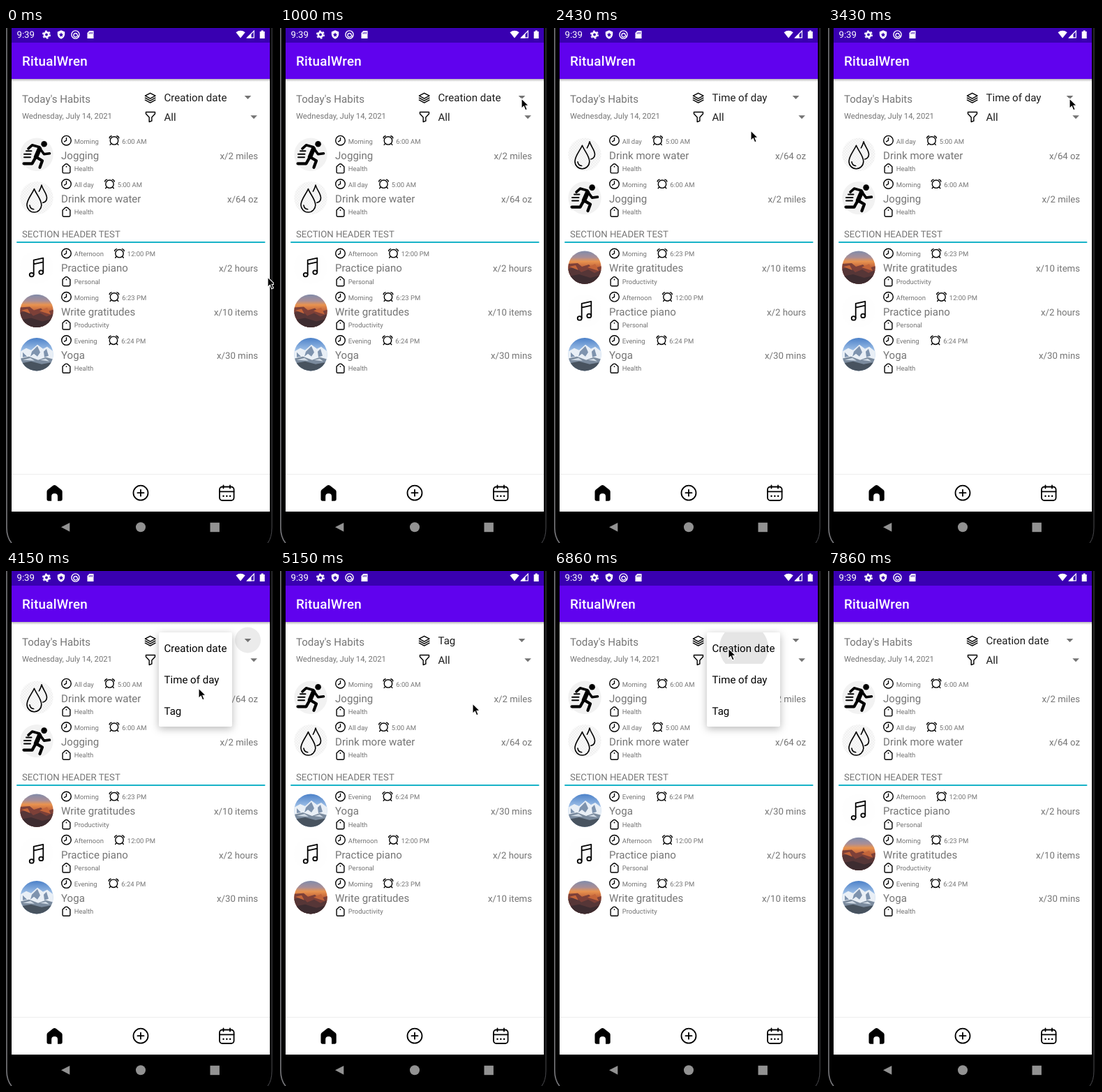
Recreate the animation shown at these times as an HTML page. Size 384x738 px, loop 8.14 s.

```html
<!DOCTYPE html>
<html lang="en">
<head>
<meta charset="utf-8">
<title>RitualWren</title>
<style>
  html, body { margin: 0; width: 100%; height: 100%; overflow: hidden; background: #000; }
  svg { display: block; width: 384px; height: 738px; }
  text { font-family: Roboto, sans-serif; font-size: 15.08px; fill: #757575; text-rendering: geometricPrecision; }
  .title { font-size: 18.84px; font-weight: 500; letter-spacing: .23px; fill: #fff; }
  .mid { font-size: 13.2px; }
  .date { font-size: 11.3px; }
  .small { font-size: 9.5px; }
  .dark { fill: #1c1c1c; }
  .item { fill: #000; }
  .end { text-anchor: end; }
  .line { fill: none; stroke: #000; stroke-width: 1.4; stroke-linecap: round; stroke-linejoin: round; }
  #popup .card { filter: drop-shadow(0 3px 6px rgba(0, 0, 0, .28)); }
</style>
</head>
<body>
<svg id="stage" viewBox="0 0 384 738">
  <defs>
    <linearGradient id="shade" x2="0" y2="1">
      <stop stop-color="#000" stop-opacity=".28"/><stop offset="1" stop-color="#000" stop-opacity="0"/>
    </linearGradient>
    <linearGradient id="dusk" x2="0" y2="1">
      <stop stop-color="#7f8cab"/><stop offset=".2" stop-color="#a98e96"/><stop offset=".32" stop-color="#e9934f"/>
      <stop offset=".5" stop-color="#c0623a"/><stop offset="1" stop-color="#4a3033"/>
    </linearGradient>
    <linearGradient id="sky" x2="0" y2="1">
      <stop stop-color="#4a80c8"/><stop offset=".4" stop-color="#a3c3e8"/>
    </linearGradient>
    <pattern id="check" width="4" height="4" patternUnits="userSpaceOnUse">
      <path d="M0 0h4v4h-4z" fill="#fafafa"/><path d="M0 0h2v2h-2zM2 2h2v2h-2z" fill="#f0f0f0"/>
    </pattern>
    <clipPath id="disc"><circle r="23.7"/></clipPath>
    <clipPath id="itemClip"><rect x="219" width="105" height="45"/></clipPath>

    <g id="clock" class="line"><circle r="6.8"/><path d="M0-3.8V0L-3 1.6"/></g>
    <g id="alarm" class="line">
      <circle r="5.7"/><path d="M-6.8-3.6Q-6.6-6.2-3.8-6.6M6.8-3.6Q6.6-6.2 3.8-6.6M-4.5 4.5L-5.8 6M4.5 4.5L5.8 6"/>
    </g>
    <g id="tag" class="line">
      <path d="M-5.4-2.6L-1.6-6.1Q0-7.1 1.6-6.1L5.4-2.6V5Q5.4 6.6 3.8 6.6H-3.8Q-5.4 6.6-5.4 5Z"/>
      <circle cy="-2.6" r=".9" fill="#000" stroke="none"/>
    </g>

    <g id="run">
      <circle r="23.7" fill="#f2f2f2"/>
      <circle cx="10.6" cy="-15" r="4.3"/>
      <g class="line" stroke-linejoin="miter">
        <path style="stroke-width:6.4" d="M4-8L-1 3.5"/>
        <path style="stroke-width:3.6" d="M4-10.5L-6.5-13.5L-12-8.5M5-8L10.5-.5L18.5-1.5"/>
        <path style="stroke-width:4.2" d="M-1 3.5L8 9L4.5 18.5M-2 5L-6.5 13L-18.5 13"/>
        <path style="stroke-width:2" d="M-15-5H-7.5M-18-.5H-8.5M-18 4H-9"/>
      </g>
    </g>
    <g id="drops">
      <circle r="23.7" fill="url(#check)"/>
      <g class="line" style="stroke-width:1.6">
        <path d="M-3.5-13C-7-5-14 2-14 10A10.4 10.4 0 0 0 6.8 10C6.8 2-.5-5-3.5-13Z"/>
        <path d="M3.4-9.5Q6-14 7-18.5C9-11 14.5-6.5 14.5 0Q14.2 5.5 8.8 6.7M-10 10.5Q-9.3 15.5-4.3 16.2"/>
      </g>
    </g>
    <g id="notes">
      <circle r="23.7" fill="#fefefe"/>
      <g class="line" style="stroke-width:1.8">
        <path d="M-4.3 10V-10.5L9.3-13.5V6.5M-4.3-4.7L9.3-7.7"/>
        <ellipse cx="-7.3" cy="10.5" rx="3" ry="2.8"/><ellipse cx="6.3" cy="7" rx="3" ry="2.8"/>
      </g>
    </g>
    <g id="canyon" clip-path="url(#disc)">
      <path d="M-24-24h48v48h-48z" fill="url(#dusk)"/>
      <path d="M-24-5L-10-6L-4-1L6-4L12 2L24-2V24H-24Z" fill="#7d4038"/>
      <path d="M-24 2L-12 0L-5 7L5 3L14 8L24 4V24H-24Z" fill="#563637"/>
      <path d="M-22-1L-13-3L-9 4ZM4 0L15-5L20 5Z" fill="#c4653a"/>
      <path d="M-24 13L-8 10L8 15L24 11V24H-24Z" fill="#3d2c30"/>
    </g>
    <g id="peaks" clip-path="url(#disc)">
      <path d="M-24-24h48v48h-48z" fill="url(#sky)"/>
      <path d="M-24-4L-15-9L-8-6L1-14L9-8L15-11L24-4V24H-24Z" fill="#e9eff6"/>
      <path d="M1-12L5-3L1 3L-4-1L-9 3L-7-4ZM14-8L17 2L11 4L10-4ZM-20-3L-14 3L-20 4Z" fill="#7e93ae"/>
      <path d="M-24 6L-11 3L2 8L13 4L24 7V24H-24Z" fill="#7b8b9e"/>
      <path d="M-20 8L-9 5L-3 9ZM5 8L13 6L18 10Z" fill="#cfd9e4"/>
      <path d="M-24 13L-8 10L7 14L24 11V24H-24Z" fill="#48535f"/>
    </g>
  </defs>

  <path d="M0 0h384v738H0z"/>
  <path d="M1 0V716Q1 730 8 738" fill="none" stroke="#77777b" stroke-width="1.6"/>
  <path d="M381 0V716Q381 730 375 738" fill="none" stroke="#4c4c50"/>
  <path d="M8 0h370v21H8z" fill="#3900b1"/>
  <path d="M8 73h370v620H8z" fill="#fff"/>
  <path d="M8 73h370v4H8z" fill="url(#shade)"/>
  <path d="M8 21h370v52H8z" fill="#6002ee"/>

  <g fill="#fff">
    <text x="15.5" y="14.2" class="mid" style="fill:#fff">9:39</text>
    <circle cx="58" cy="9.5" r="3.2" fill="none" stroke="#fff" stroke-width="2.6"/>
    <circle cx="58" cy="9.5" r="5.3" fill="none" stroke="#fff" stroke-width="1.6" stroke-dasharray="2.8 2.75"/>
    <path d="M79 3.2L84.2 5.4V9Q84 13.7 79 15.8Q74 13.7 73.8 9V5.4Z"/>
    <path d="M79 6.2L80 8.4L82.3 8.7L80.6 10.3L81 12.6L79 11.5L77 12.6L77.4 10.3L75.7 8.7L78 8.4Z" fill="#3900b1"/>
    <g fill="none" stroke="#fff" stroke-width="1.4"><circle cx="99.5" cy="9.5" r="5.6"/><path d="M102 11.5A2.7 2.7 0 1 1 102.2 9.5L104 13.5"/></g>
    <path d="M119.4 4H125.5V15H116.5V7Z"/>
    <path d="M119.2 6.5v2M121.2 5.8v2.7M123.3 5.8v2.7" stroke="#3900b1"/>
    <path d="M329.5 6.2Q336 1.5 342.7 6.2L336 14.6Z"/>
    <path d="M345.5 13.9L355.3 4.2V13.9Z" fill="none" stroke="#fff" stroke-width="1.2"/>
    <path d="M345 14.5L351.5 8V14.5Z"/>
    <path d="M363.7 5H365.7V3.6H368.7V5H370.7V15H363.7Z"/>
  </g>

  <text x="23" y="54.4" class="title">RitualWren</text>
  <text x="23" y="106.5">Today's Habits</text>
  <text x="23" y="130" class="date">Wednesday, July 14, 2021</text>

  <g class="line">
    <path d="M206.7 93.3L214 97.2L206.7 101.1L199.4 97.2ZM199.4 100.2L206.7 104.1L214 100.2M199.4 103.2L206.7 107.1L214 103.2"/>
    <path d="M200.5 120.5H213.5V123L208.9 128V133.2L205.2 134.5V128L200.5 123Z"/>
  </g>
  <circle id="press" cx="346.5" cy="99" r="18.5"/>
  <path d="M341.7 97H351.3L346.5 102ZM350.3 125.2H359.9L355.1 130.2Z" fill="#737373"/>
  <text id="sort" x="226.5" y="105" class="dark"></text>
  <text x="226.5" y="133.2" class="dark">All</text>

  <g id="rows"></g>
  <text x="23" y="300" class="mid">SECTION HEADER TEST</text>
  <path d="M16 307H370.5" stroke="#18b3c7" stroke-width="2" stroke-linecap="round"/>

  <path d="M8 639.5H378" stroke="#eee"/>
  <path d="M58.5 664.5Q58.5 662.7 60 661.5L67.3 655.7Q69.5 654.2 71.7 655.7L79 661.5Q80.7 662.7 80.7 664.5V675Q80.7 677.7 78 677.7H74V671.2Q74 667 69.6 667Q65.2 667 65.2 671.2V677.7H61Q58.5 677.7 58.5 675Z"/>
  <g class="line" style="stroke-width:1.8">
    <circle cx="193" cy="666.2" r="10.5"/><path d="M193 661.7V670.7M188.5 666.2H197.5"/>
    <rect x="306" y="657.5" width="20.6" height="19.5" rx="4"/>
    <path d="M306 664.3H326.6M311.5 655.5V659.5M321 655.5V659.5"/>
    <path d="M311.5 670.8h.1M316.3 670.8h.1M321.1 670.8h.1" style="stroke-width:2.4"/>
  </g>

  <g fill="#929292">
    <path d="M79 715.3L91.3 709V721.7Z"/><circle cx="193" cy="715.3" r="7"/><path d="M292.5 708.8h13.4v13.4h-13.4z"/>
  </g>

  <g id="popup">
    <rect class="card" x="219" y="88" width="105" height="135" rx="2" fill="#fff"/>
    <g id="spot" clip-path="url(#itemClip)"><circle id="ring" cx="272" cy="22" fill="#e5e5e5"/></g>
    <text x="226.5" y="116.2" class="item">Creation date</text>
    <text x="226.5" y="161.4" class="item">Time of day</text>
    <text x="226.5" y="206.3" class="item">Tag</text>
  </g>
  <path id="cursor" d="M0 0V14.4L3.3 11.3L5.6 16.8L8.2 15.7L5.9 10.4H10.4Z" stroke="#fff" stroke-width="1.1"/>
</svg>

<script>
const LOOP = 8140, TICK = 1000 / 7;
const $ = id => document.getElementById(id);

const habits = [
  { pic: 'run',    name: 'Jogging',          when: 'Morning',   alarmX: 155,   at: '6:00 AM',  tag: 'Health',       goal: 'x/2 miles' },
  { pic: 'drops',  name: 'Drink more water', when: 'All day',   alarmX: 148.5, at: '5:00 AM',  tag: 'Health',       goal: 'x/64 oz' },
  { pic: 'notes',  name: 'Practice piano',   when: 'Afternoon', alarmX: 162.5, at: '12:00 PM', tag: 'Personal',     goal: 'x/2 hours' },
  { pic: 'canyon', name: 'Write gratitudes', when: 'Morning',   alarmX: 155,   at: '6:23 PM',  tag: 'Productivity', goal: 'x/10 items' },
  { pic: 'peaks',  name: 'Yoga',             when: 'Evening',   alarmX: 154,   at: '6:24 PM',  tag: 'Health',       goal: 'x/30 mins' }
];
const rowY = [0, 62.3, 161.8, 224.1, 286.4];

// order[i] is the slot of habit i
const sorts = [
  { label: 'Creation date', order: [0, 1, 2, 3, 4] },
  { label: 'Time of day',   order: [1, 0, 3, 2, 4] },
  { label: 'Tag',           order: [0, 1, 3, 4, 2] }
];

// ticks: arrow pressed, menu open, item pressed, menu closing
const picks = [
  { press: 8,  open: 9,  tap: 13, close: 14, sort: 1, fade: [.08, .08, .05, .02] },
  { press: 27, open: 28, tap: 32, close: 33, sort: 2, fade: [.07, .08, .08, .04, .02] },
  { press: 44, open: 45, tap: 48, close: 49, sort: 0, fade: [.08, .08, .05] }
];

// tick, x, y
const path = [
  [0, 375, 357], [2, 370, 300], [5, 351, 140], [7, 346, 101], [9, 346, 101], [11, 284, 140],
  [13, 282, 148], [17, 282, 147], [20, 338, 106], [22, 340, 104], [24, 346, 101], [27, 346, 101],
  [29, 276, 168], [31, 272, 196], [33, 273, 196], [36, 276, 190], [38, 296, 160], [41, 341, 104],
  [42, 341, 104], [43, 346, 101], [45, 346, 101], [47, 256, 112], [48, 250, 111], [50, 250, 112],
  [52, 335, 250], [53, 410, 340], [57, 410, 340]
];

$('rows').innerHTML = habits.map(h => `<g>
  <use href="#${h.pic}" x="44" y="181.3"/>
  <use href="#clock" x="86.5" y="161.2"/><text x="97.7" y="165.7" class="small">${h.when}</text>
  <use href="#alarm" x="${h.alarmX}" y="161.4"/><text x="${h.alarmX + 11.3}" y="165.7" class="small">${h.at}</text>
  <text x="79" y="187.6">${h.name}</text>
  <use href="#tag" x="86.5" y="201.3"/><text x="97.7" y="205.1" class="small">${h.tag}</text>
  <text x="361" y="187.6" class="mid end">${h.goal}</text>
</g>`).join('');
const rows = [...$('rows').children];

function cursorAt(k) {
  const i = path.findIndex(p => p[0] > k);
  const [a, x0, y0] = path[i - 1], [b, x1, y1] = path[i];
  const u = (k - a) / (b - a);
  return [x0 + (x1 - x0) * u, y0 + (y1 - y0) * u];
}

function draw(k) {
  let sort = sorts[0], press = 0, popup = 0, ring = 0;
  for (const p of picks) {
    if (k >= p.close) sort = sorts[p.sort];
    press = p.fade[k - p.press] || press;
    if (k >= p.open && k <= p.close) popup = k === p.close ? .35 : k === p.open ? .7 : 1;
    if (k >= p.tap && k <= p.close) {
      ring = k === p.tap ? 35 : 60;
      $('spot').setAttribute('transform', `translate(0 ${88 + 45 * ((p.sort + 3) % 3)})`);
    }
  }
  $('sort').textContent = sort.label;
  rows.forEach((row, i) => row.setAttribute('transform', `translate(0 ${rowY[sort.order[i]]})`));
  $('press').setAttribute('fill-opacity', press);
  $('popup').setAttribute('opacity', popup);
  $('ring').setAttribute('r', ring);
  $('cursor').setAttribute('transform', `translate(${cursorAt(k)})`);
}

const start = performance.now();
let last = -1;
function loop() {
  const t = (performance.now() - start) % LOOP;
  const k = Math.min(56, Math.floor((t + 4) / TICK));
  if (k !== last) draw(last = k);
  requestAnimationFrame(loop);
}
loop();
</script>
</body>
</html>
```
